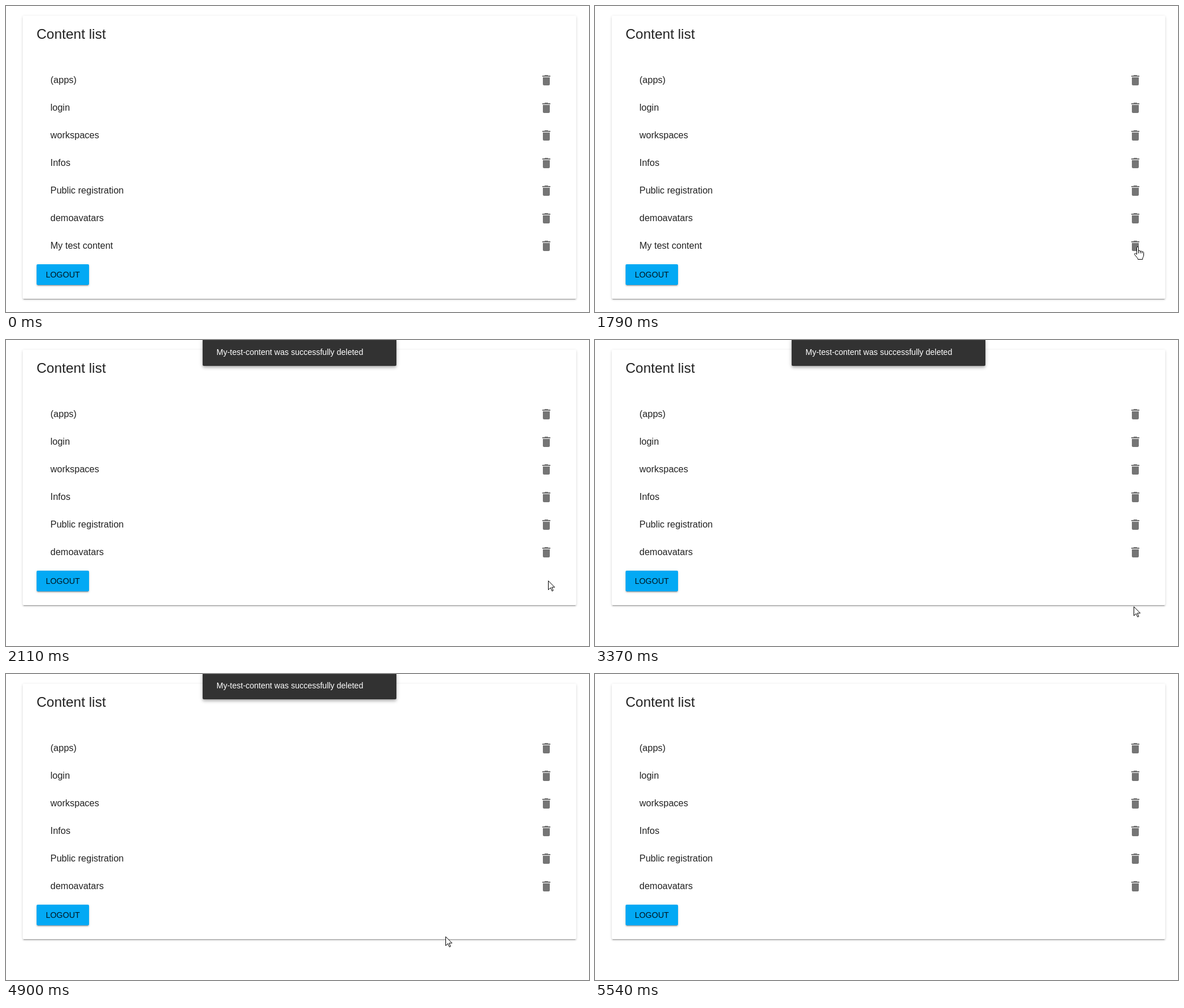
An HTML page for the animation above (6.25 s loop, 1011 px wide and 532 px high).

```html
<!DOCTYPE html>
<html lang="en">
<head>
<meta charset="utf-8">
<title>Content list</title>
<style>
  html, body { margin: 0; width: 100%; height: 100%; overflow: hidden; background: #fff; }
  body { font: 16px Arial, "Liberation Sans", sans-serif; color: rgba(0, 0, 0, .87); }
  #stage { position: relative; width: 1011px; height: 532px; overflow: hidden; }
  #stage > *, #card > * { position: absolute; white-space: nowrap; }
  #card, #logout {
    border-radius: 2px;
    box-shadow: 0 3px 1px -2px rgba(0, 0, 0, .2), 0 2px 2px rgba(0, 0, 0, .14), 0 1px 5px rgba(0, 0, 0, .12);
  }
  #card { left: 29px; top: 17px; width: 960px; background: #fff; }
  #title { left: 24px; top: 16px; font-size: 24px; line-height: 32px; }
  .row { left: 48px; width: 872px; height: 48px; line-height: 48px; }
  .row svg { position: absolute; left: 848px; top: 12px; fill: #757575; }
  #logout {
    left: 24px; bottom: 24px; width: 91px; height: 36px;
    background: #03a9f4; font-size: 14px; line-height: 36px; text-align: center;
  }
  #toast {
    left: 341px; width: 312px; height: 48px; padding-left: 24px;
    border-radius: 2px; background: #323232; color: #fff; font-size: 14px; line-height: 48px;
    box-shadow: 0 2px 4px -1px rgba(0, 0, 0, .2), 0 4px 5px rgba(0, 0, 0, .14), 0 1px 10px rgba(0, 0, 0, .12);
  }
  .pointer { fill: #fff; stroke: #000; overflow: visible; }
</style>
</head>
<body>
<div id="stage">
  <div id="card">
    <div id="title">Content list</div>
    <div id="logout">LOGOUT</div>
  </div>
  <div id="toast">My-test-content was successfully deleted</div>
  <svg id="arrow" class="pointer" width="13" height="20">
    <path d="M.5.7V16.3L4.3 12.7 6.9 18.5 9 17.6 6.5 11.9H11.5Z"/>
  </svg>
  <svg id="hand" class="pointer" width="18" height="24">
    <path d="M4.5 14V2.5q0-2 1.5-2t1.5 2V8.5q.3-1.2 1.6-1.2t1.6 1.6q.3-.8 1.4-.8t1.5 1.5q.4-.6 1.3-.6t1.6 1.9V15q0 2-1 3.5t-1 4h-8q-.3-2-2-3.8L1 14.5q-1-1.6.2-2.3t2.4.8z"/>
    <path fill="none" d="M7.5 8V12M10.7 9V12M13.6 9.5V12"/>
  </svg>
</div>
<script>
const LOOP = 6250;
const $ = id => document.getElementById(id);
const card = $('card'), toast = $('toast'), arrow = $('arrow'), hand = $('hand');

const names = ['(apps)', 'login', 'workspaces', 'Infos', 'Public registration', 'demoavatars', 'My test content'];
const bin = '<svg width="24" height="24"><path d="M6 19c0 1.1.9 2 2 2h8c1.1 0 2-.9 2-2V7H6v12zM19 4h-3.5l-1-1h-5l-1 1H5v2h14V4z"/></svg>';
const rows = names.map((name, i) => {
  const row = document.createElement('div');
  row.className = 'row';
  row.style.top = 88 + 48 * i + 'px';
  row.innerHTML = name + bin;
  card.append(row);
  return row;
});

// The screen refreshes only at these moments.
const ticks = [0, 250, 330, 410, 480, 550, 620, 690, 770, 1790, 1870, 1930, 2010, 2110,
  3370, 3430, 4660, 4750, 4830, 4910, 4990, 5070, 5300, 5380, 5460, 5540];

const clamp = v => Math.min(1, Math.max(0, v));
const span = (t, from, to) => clamp((t - from) / (to - from));
const mix = (a, b, p) => a + (b - a) * p;
const easeOut = p => 1 - (1 - p) ** 1.6;
const easeIn = p => p ** 1.4;
const easeBoth = p => p * p * (3 - 2 * p);

// CSS-style timing curve whose handles have heights 0 and 1.
function bezier(x1, x2, x) {
  let lo = 0, hi = 1;
  for (let i = 0; i < 24; i++) {
    const s = (lo + hi) / 2, r = 1 - s;
    if (3 * r * r * s * x1 + 3 * r * s * s * x2 + s ** 3 < x) lo = s; else hi = s;
  }
  return easeBoth(lo);
}

const moves = [
  { start: 250, end: 770, until: 3370, from: [917, 520], to: [940, 418], ease: easeOut },
  { start: 3370, end: 3430, until: 3430, from: [934, 463], to: [934, 463], ease: easeOut },
  { start: 4660, end: 4990, until: 5300, from: [880, 508], to: [654, 408], ease: easeBoth },
  { start: 5220, end: 5460, until: 5540, from: [654, 408], to: [874, 514], ease: easeIn }
];

function pointerAt(t) {
  const m = moves.find(m => t >= m.start && t < m.until);
  if (!m) return null;
  const p = m.ease(span(t, m.start, m.end));
  return m.from.map((v, i) => Math.round(mix(v, m.to[i], p)));
}

function place(el, show, x, y) {
  el.style.display = show ? 'block' : 'none';
  el.style.left = x + 'px';
  el.style.top = y + 'px';
}

function draw(t) {
  const deleted = t >= 1870;
  rows[6].style.display = deleted ? 'none' : 'block';
  card.style.height = (deleted ? 444 : 492) + 'px';

  const shown = bezier(0, .2, span(t, 1845, 2070)) - bezier(.4, 1, span(t, 4810, 5005));
  place(toast, t >= 1870 && t < 5070, 341, Math.round(-3 - 48 * (1 - shown)));

  const pos = pointerAt(t);
  const [x, y] = pos || [0, 0];
  const hover = t < 1930 && y < 437;
  place(arrow, pos && !hover, x, y);
  place(hand, pos && hover, x - 5, y);
}

const origin = performance.now();
function frame(now) {
  const t = Math.max(0, now - origin) % LOOP;
  draw(ticks.filter(k => k <= t).pop());
  requestAnimationFrame(frame);
}
draw(0);
requestAnimationFrame(frame);
</script>
</body>
</html>
```
